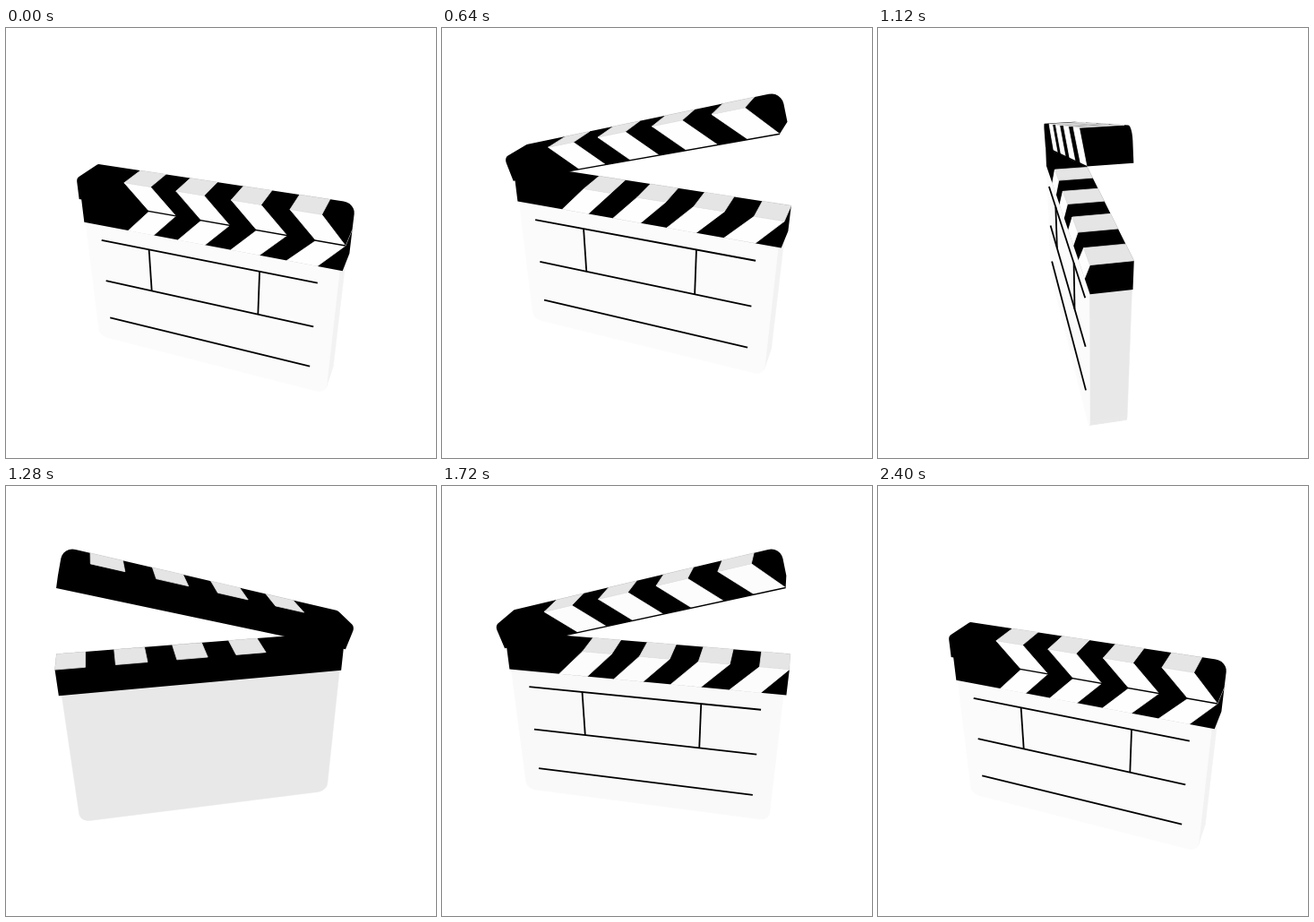
These frames come from a looping animation (480x480 px, 3 s). An HTML page with a canvas:

```html
<!DOCTYPE html>
<html lang="en">
<head>
<meta charset="utf-8">
<title>Clapperboard</title>
<style>
  html, body { margin: 0; width: 100%; height: 100%; overflow: hidden; background: #fff; }
  canvas { display: block; width: 480px; height: 480px; }
</style>
</head>
<body>
<canvas id="stage" width="480" height="480"></canvas>
<script>
const ctx = document.getElementById('stage').getContext('2d');
const LOOP = 3000, STEP = 40, MOVE_END = 2400;
const FOCAL = 666.7, PITCH = 29 * Math.PI / 180;
const SIN_P = Math.sin(PITCH), COS_P = Math.cos(PITCH);

// Board dimensions, in pixels at the rotation axis
const FRONT = 16, BACK = -22, LEFT = -149, RIGHT = 153, ARM_LEFT = -152;
const BODY_LEFT = -147, BODY_RIGHT = 150;
const BOTTOM = -158, BAR_BOTTOM = 6.7, SEAM = 36, ARM_TOP = 65.5;
const HINGE = { x: -137, y: SEAM };
const STRIPE = { first: -91, period: 62, width: 32, slant: 28.5, count: 4 };
const BLACK = '#000', TOP_GRAY = '#e5e5e5';

const clamp = (v, lo = 0, hi = 1) => Math.min(hi, Math.max(lo, v));
const smooth = u => u * u * (3 - 2 * u);
const cubicInOut = u => u < .5 ? 4 * u ** 3 : 1 - 4 * (1 - u) ** 3;
const rad = deg => deg * Math.PI / 180;

// Smooth interpolation through [time, value] keys
function keyed(keys, t) {
  for (let i = 1; i < keys.length; i++) {
    const [t0, a] = keys[i - 1], [t1, b] = keys[i];
    if (t <= t1) return a + (b - a) * smooth((t - t0) / (t1 - t0));
  }
  return keys[keys.length - 1][1];
}

const liftAt = t => keyed([[0, 0], [800, 30], [1740, 26], [2400, 0]], t);
const armAt = t => keyed([[0, 0], [600, 17.2], [1280, 16.6], [1960, 16.8], [2400, 0]], t);
const yawAt = t => -21 - 360 * cubicInOut(clamp((t - 683) / 1275));

let pose;

function setPose(t) {
  const yaw = rad(yawAt(t)), arm = rad(armAt(t));
  pose = { lift: liftAt(t), sin: Math.sin(yaw), cos: Math.cos(yaw),
           armSin: Math.sin(arm), armCos: Math.cos(arm) };
}

const fixed = p => p;
function swung([x, y, z]) {
  const dx = x - HINGE.x, dy = y - HINGE.y;
  return [HINGE.x + dx * pose.armCos - dy * pose.armSin,
          HINGE.y + dx * pose.armSin + dy * pose.armCos, z];
}

function project([px, py, pz]) {
  const x = px + 2, y = py + pose.lift;
  const wx = x * pose.cos + pz * pose.sin - 16.5;
  const wz = pz * pose.cos - x * pose.sin;
  const scale = FOCAL / (FOCAL - wz * COS_P - y * SIN_P);
  return [240 + wx * scale, 240 - (y * COS_P - wz * SIN_P) * scale];
}

// Projects a face; returns null unless its counter-clockwise side is in view
function visible(points, place) {
  const flat = points.map(p => project(place(p)));
  const area = flat.reduce((sum, [x, y], i) => {
    const [nx, ny] = flat[(i + 1) % flat.length];
    return sum + x * ny - nx * y;
  }, 0);
  return area < 0 ? flat : null;
}

function addPath(flat) {
  flat.forEach(([x, y], i) => i ? ctx.lineTo(x, y) : ctx.moveTo(x, y));
}

function face(points, color, place, edge = .8) {
  const flat = visible(points, place);
  if (!flat) return;
  ctx.beginPath();
  addPath(flat);
  ctx.closePath();
  ctx.fillStyle = ctx.strokeStyle = color;
  ctx.lineWidth = edge;
  ctx.fill();
  ctx.stroke();
}

function line(a, b, width, place = fixed) {
  ctx.beginPath();
  addPath([a, b].map(p => project(place(p))));
  ctx.strokeStyle = BLACK;
  ctx.lineWidth = width;
  ctx.stroke();
}

function shade(nx, brightest = 254) {
  const v = Math.round(232 + (brightest - 232) * smooth(clamp((.2 - nx) / .5)) + 16 * Math.max(0, nx - .3));
  return `rgb(${v},${v},${v})`;
}

// Faces of a convex counter-clockwise outline, extruded from back to front
function extrude(outline) {
  const sides = outline.map(([ax, ay], i) => {
    const [bx, by] = outline[(i + 1) % outline.length];
    const nx = (by - ay) / (Math.hypot(bx - ax, by - ay) || 1);
    return { points: [[ax, ay, FRONT], [ax, ay, BACK], [bx, by, BACK], [bx, by, FRONT]],
             facing: () => nx * pose.cos };
  });
  return [
    ...sides,
    { points: outline.map(([x, y]) => [x, y, FRONT]), facing: () => pose.sin },
    { points: outline.map(([x, y]) => [x, y, BACK]).reverse(), facing: () => -pose.sin }
  ];
}

// One fill for all faces, so no hairlines show between them
function blackSolid(faces, place) {
  ctx.beginPath();
  for (const { points } of faces) {
    const flat = visible(points, place);
    if (flat) { addPath(flat); ctx.closePath(); }
  }
  ctx.fillStyle = BLACK;
  ctx.fill();
}

function corner(cx, cy, r, from) {
  return Array.from({ length: 7 }, (_, i) => {
    const a = rad(from + i * 15);
    return [cx + r * Math.cos(a), cy + r * Math.sin(a)];
  });
}

const body = extrude([
  ...corner(BODY_LEFT + 11, BOTTOM + 11, 11, 180),
  ...corner(BODY_RIGHT - 11, BOTTOM + 11, 11, 270),
  [BODY_RIGHT, BAR_BOTTOM], [BODY_LEFT, BAR_BOTTOM]
]);
const bar = extrude([[LEFT, BAR_BOTTOM], [RIGHT, BAR_BOTTOM], [RIGHT, SEAM], [LEFT, SEAM]]);
const arm = extrude([
  [ARM_LEFT, SEAM], [RIGHT, SEAM],
  ...corner(RIGHT - 12, ARM_TOP - 12, 12, 0),
  ...corner(ARM_LEFT + 8, ARM_TOP - 8, 8, 90)
]);

function stripes(low, high, lowShift, highShift, place) {
  const white = shade(pose.sin);
  for (let i = 0; i < STRIPE.count; i++) {
    const start = STRIPE.first + i * STRIPE.period;
    const span = shift => [start + shift, Math.min(RIGHT, start + shift + STRIPE.width)];
    const [l0, l1] = span(lowShift), [h0, h1] = span(highShift);
    face([[l0, low, FRONT], [l1, low, FRONT], [h1, high, FRONT], [h0, high, FRONT]], white, place);
    face([[h0, high, FRONT], [h1, high, FRONT], [h1, high, BACK], [h0, high, BACK]], TOP_GRAY, place);
  }
}

function ruling() {
  const rows = [-13.1, -69.2, -124.5], column = 66;
  rows.forEach(y => line([-128, y, FRONT], [129, y, FRONT], 1.8));
  [-column, column].forEach(c => line([c, rows[0], FRONT], [c, rows[1], FRONT], 1.8));
}

function draw(t) {
  ctx.fillStyle = '#fff';
  ctx.fillRect(0, 0, 480, 480);
  setPose(t);
  const frontVisible = visible(body[body.length - 2].points, fixed);

  body.forEach(({ points, facing }) => face(points, shade(facing(), 251), fixed, .5));
  if (frontVisible) ruling();
  blackSolid(bar, fixed);
  stripes(BAR_BOTTOM, SEAM, 0, STRIPE.slant, fixed);
  blackSolid(arm, swung);
  stripes(SEAM, ARM_TOP, STRIPE.slant, 0, swung);
  if (frontVisible) line([HINGE.x, SEAM, FRONT], [RIGHT, SEAM, FRONT], 1.4, swung);
}

const began = performance.now();
function tick() {
  const t = (performance.now() - began) % LOOP;
  draw(Math.min(MOVE_END, Math.floor(t / STEP) * STEP));
  requestAnimationFrame(tick);
}
tick();
</script>
</body>
</html>
```
